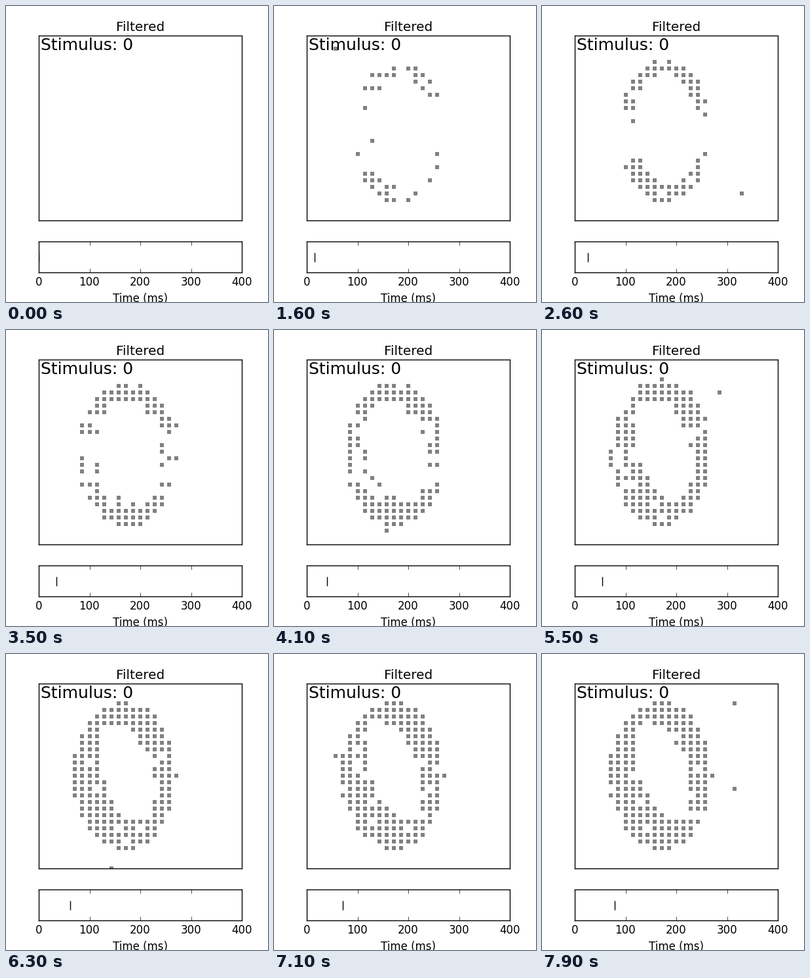
A matplotlib script that plays this animation: 400x450 px, repeating every 8 s.

```python
import math

import matplotlib.pyplot as plt
import numpy as np
from matplotlib.animation import FuncAnimation
from matplotlib.transforms import Affine2D

plt.style.use("classic")
plt.rcParams.update({"font.family": "DejaVu Sans", "toolbar": "None"})

FRAMES = 80
INTERVAL = 100
GRID = 28
HOLD = 10          # frames a cell stays lit after a spike
QUIET = 6          # no ring spikes before this frame
SPAN = 400         # ms on the time axis
PX_PER_MS = 310 / SPAN

# Ellipses as (cx, cy, a, b), early and late
OUTER = np.array([[12.7, 13.2, 6.4, 10.7], [11.8, 14.0, 7.2, 11.2]])
INNER = np.array([[13.0, 13.2, 5.1, 8.2], [12.1, 14.6, 3.4, 7.5]])
LATE_SKEW = -0.25

rng = np.random.default_rng(4)
ROW, COL = np.mgrid[0:GRID + 1, 0:GRID + 1]
PHASE = rng.integers(0, HOLD, ROW.shape)
DRAWS = rng.random((FRAMES // HOLD + 1,) + ROW.shape)


def mix(pair, s):
    return pair[0] + (pair[1] - pair[0]) * s


def inside(ellipse, skew=0):
    cx, cy, a, b = ellipse
    dy = ROW - cy
    return ((COL - cx - skew * dy) / a) ** 2 + (dy / b) ** 2 <= 1


def spike_chance(t):
    """Chance that each cell fires: poles fill first, the sides later."""
    s = 1 - (1 - np.clip((t - 16) / 63, 0, 1)) ** 2
    outer, inner = mix(OUTER, s), mix(INNER, s)
    ring = inside(outer) & ~inside(inner, LATE_SKEW * s)
    pole = 0.97 * (1 - math.exp(-max(t - 7, 0) / 9))
    side = 0.9 * np.clip((t - 10) / 53, 0, 1) ** 1.5
    height = np.clip(np.abs(ROW - outer[1]) / (0.65 * outer[3]), 0, 1)
    return ring * mix((side, pole), height ** 2)


def spikes_at(t):
    """Cells whose turn comes at frame t and which fire."""
    turn = (PHASE == t % HOLD) & (t >= QUIET)
    return turn & (DRAWS[t // HOLD] < spike_chance(t + HOLD / 2))


SPIKES = np.array([spikes_at(t) for t in range(FRAMES)])
# A lone noise spike now and then, anywhere on the grid
for t in range(2, FRAMES, 7):
    SPIKES[t, rng.integers(GRID), rng.integers(4, GRID)] = True

fig, (view, clock) = plt.subplots(
    2, 1, figsize=(4, 4.5), dpi=100, facecolor="white",
    gridspec_kw={"height_ratios": [6, 1], "hspace": 0.2})

view.set(xlim=(0, GRID), ylim=(0, GRID), xticks=[], yticks=[])
title = view.set_title("Filtered")
view.text(0.01, 0.92, "Stimulus: 0", fontsize=18, transform=view.transAxes)
dots, = view.plot([], [], "s", color="0.5", ms=4.32, mew=0)

clock.set(xlim=(0, SPAN), ylim=(0, 1), yticks=[])
clock.set_xticks(range(0, SPAN + 1, 100))
label = clock.set_xlabel("Time (ms)")
hand, = clock.plot([0], [0.5], "k|", ms=10, mew=1)

# Centred text that lands on half a pixel rounds to the left
nudge = Affine2D().translate(-0.2, 0)
for text in [title, label, *clock.get_xticklabels()]:
    text.set_transform(text.get_transform() + nudge)


def update(n):
    lit = SPIKES[max(0, n - HOLD + 1):n + 1].any(axis=0)
    dots.set_data(COL[lit], ROW[lit])
    hand.set_data([math.floor(n * PX_PER_MS) / PX_PER_MS], [0.5])
    return dots, hand


anim = FuncAnimation(fig, update, frames=FRAMES, interval=INTERVAL,
                     repeat=True, repeat_delay=0)
plt.show()
```
